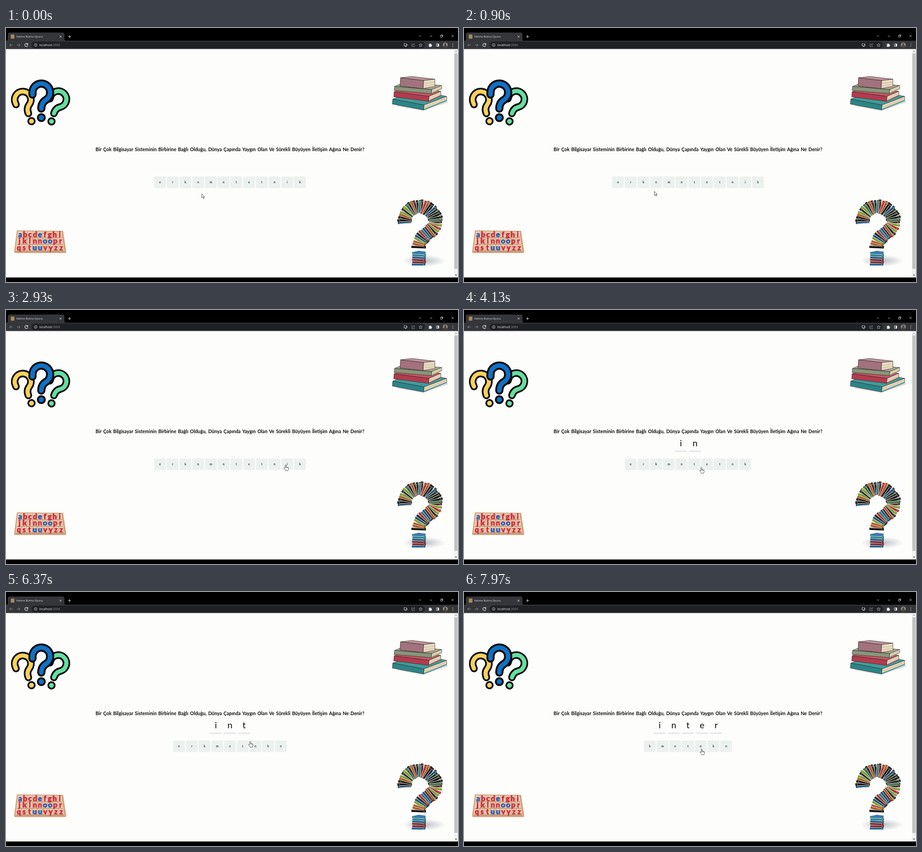
These frames come from a looping animation (998x561 px, 8 s). An HTML page:

```html
<!DOCTYPE html>
<html lang="tr">
<head>
<meta charset="utf-8">
<title>Kelime Bulma Oyunu</title>
<style>
  html, body { margin: 0; width: 100%; height: 100%; overflow: hidden; background: #000; }
  svg { display: block; width: 100vw; height: 100vh; }
  .ui { font-family: "Open Sans", sans-serif; }
  .page { font-family: Lato, sans-serif; text-anchor: middle; }
  .icon { fill: none; stroke: #dfe1e5; stroke-width: 1; }
</style>
</head>
<body>
<svg viewBox="0 0 998 561">
  <rect width="998" height="561"/>

  <!-- browser window -->
  <g class="ui">
    <path d="M1 28Q4 28 4 25V14Q4 10 8 10H125Q129 10 129 14V25Q129 28 132 28H998V47H0V28Z" fill="#35363a"/>
    <rect x="10.500" y="14.500" width="8" height="9" rx="1" fill="#a98a5c"/>
    <text x="23" y="21.300" font-size="5.950" fill="#e8eaed">Kelime Bulma Oyunu</text>
    <rect x="56" y="30" width="869" height="15" rx="7.500" fill="#202124"/>
    <text x="73.500" y="39.900" font-size="6.800" fill="#e8eaed">localhost<tspan fill="#8f959b">:3000</tspan></text>
    <g class="icon">
      <path d="M118.500 17l4 4m0-4l-4 4M137 19h6.500m-3.250-3.250v6.500"/>
      <path d="M15 37.500H8m3.300-3.300L8 37.500l3.300 3.300M24 37.500h7m-3.300-3.300l3.300 3.300-3.300 3.300" stroke="#85888d"/>
      <path d="M47.500 35.300A3.400 3.400 0 1 0 48.200 38.500M48.200 33.700v2.600h-2.700" stroke-width="1.200"/>
      <circle cx="65.500" cy="37.500" r="3" stroke-width=".8"/>
      <path d="M65.500 37v2.200m0-3.800v.8" stroke-width=".8"/>
      <path d="M911.800 16.500l2.300 2.300 2.300-2.300M936 18h5M983.500 15l5 5m0-5l-5 5" stroke-width=".8"/>
      <path d="M959.500 16.500h3.700v3.700h-3.700zM960.800 16.300v-1.200h3.700v3.700h-1.200" stroke-width=".8"/>
      <path d="M882.500 34.500h-3.500v5h6.500v-2m-4.500 3.500h3m.5-7v3.500m-1.500-1.500l1.500 1.500 1.500-1.500" stroke-width=".9"/>
      <path d="M898 35h-2v6h6v-2m-4 0q.500-3.500 4-3.500m-1.500-1.500l2 1.500-2 1.500" stroke="#9aa0a6" stroke-width=".8"/>
      <path d="M915.500 34l1.100 2.400 2.600.3-1.900 1.800.5 2.600-2.300-1.300-2.300 1.300.5-2.600-1.900-1.800 2.600-.3z" stroke-width=".7"/>
      <path d="M950.300 35h5.500v5.500h-5.500z"/>
    </g>
    <path d="M933.500 35.500h2a1.200 1.200 0 0 1 2.400 0h1.600v2a1.200 1.200 0 0 1 0 2.400v1.600h-6v-1.800a1.200 1.200 0 0 0 0-2.200zM953 35h2.800v5.500H953z" fill="#e8eaed"/>
    <circle cx="970" cy="37.500" r="5.500" fill="#8e8a84"/>
    <path d="M966 41.200q0-3.200 4-3.200t4 3.200a5.500 5.500 0 0 1-8 0z" fill="#47433f"/>
    <circle cx="970" cy="36" r="2.200" fill="#47433f"/>
    <path d="M986.500 34.500v.1m0 2.900v.1m0 2.900v.1" stroke="#e8eaed" stroke-width="1.400" stroke-linecap="round"/>
  </g>

  <!-- page -->
  <rect y="46.500" width="998" height="504.500" fill="#fdfdfb"/>
  <rect x="989" y="47" width="9" height="504" fill="#f1f1f1"/>
  <rect x="990" y="56" width="7" height="476" fill="#c1c1c1"/>
  <path d="M991 52.500h5l-2.500-2.700z" fill="#a3a3a3"/>
  <path d="M991 544.800h5l-2.500 2.700z" fill="#505050"/>
  <g id="art"></g>

  <g class="page">
    <text x="494.500" y="272.300" font-size="10.400" word-spacing="1.250" font-weight="700" fill="#0c0c0c">Bir Çok Bilgisayar Sisteminin Birbirine Bağlı Olduğu, Dünya Çapında Yaygın Olan Ve Sürekli Büyüyen İletişim Ağına Ne Denir?</text>
    <g id="answer"></g>
    <g id="tiles"></g>
  </g>

  <path id="arrow" d="M.4 .4V9.400L2.500 7.500L3.900 10.600L5.400 9.900L4 6.900H6.600Z" fill="#fff" stroke="#222" stroke-width=".8"/>
  <g id="hand" stroke="#222" stroke-width=".75" stroke-linejoin="round">
    <path d="M-1.100 7.500V1Q-1.100 0 0 0T1.100 1V4.600Q2.600 3.900 3 5Q4.400 4.500 4.800 5.700Q6.200 5.400 6.200 7V9Q6 10.500 5.200 11.500V12.600H-.2V11.500Q-2 9.900-3.500 7.500Q-3.700 6.200-2.500 6.300Z" fill="#fff"/>
    <path d="M1.100 4.600V6.500M3 5V6.700M4.800 5.700V7" fill="none"/>
  </g>
</svg>
<script>
const LOOP = 8000, MID = 494.5, TILE = 28.1, SLOT = 31.2;
const $ = id => document.getElementById(id);

function add(parent, tag, attrs, text) {
  const el = document.createElementNS('http://www.w3.org/2000/svg', tag);
  for (const k in attrs) el.setAttribute(k, attrs[k]);
  if (text) el.textContent = text;
  return parent.appendChild(el);
}

let seed = 11;
const rand = () => (seed = (seed * 16807) % 2147483647) / 2147483647;
const pick = list => list[Math.floor(rand() * list.length)];
const art = $('art');

function questionMark(x, y, turn, scale, color) {
  const g = add(art, 'g', { transform: `translate(${x} ${y}) rotate(${turn}) scale(${scale})`, fill: 'none', 'stroke-linecap': 'round' });
  const d = 'M-19.500 5V0A19.500 19.500 0 1 1 10 17Q0 23 0 36';
  for (const [stroke, w, r] of [['#080a0c', 18, 9.8], [color, 10, 5.8]]) {
    add(g, 'path', { d, stroke, 'stroke-width': w });
    add(g, 'circle', { cy: 56, r, fill: stroke });
  }
}

function stackedBook(x0, y0, xm, ym, xr, yr, h, cover, top) {
  const face = (points, fill) => add(art, 'polygon', { points, fill, stroke: '#33292b', 'stroke-width': .8, 'stroke-linejoin': 'round' });
  face([x0, y0, xm, ym, xr, yr, x0 + xr - xm, y0 + yr - ym], top);
  face([xm, ym, xr, yr, xr, yr + h - 2, xm - 1, ym + h], '#e9dcc0');
  for (const k of [.35, .65])
    add(art, 'line', { x1: xm + 1, y1: ym + h * k, x2: xr - 1, y2: yr + h * k, stroke: '#a8977c', 'stroke-width': .6 });
  add(art, 'line', { x1: xm - 1, y1: ym + h - .5, x2: xr, y2: yr + h - 2, stroke: cover, 'stroke-width': 1.6 });
  face([x0, y0, xm, ym, xm - 1, ym + h, x0 - 1, y0 + h], cover);
}

function letterTray() {
  add(art, 'polygon', { points: '24,447 126,448 133,494 132,497 19,497 18,494', fill: '#cfa27f' });
  add(art, 'polygon', { points: '26,449 124,450 130,493 21,493', fill: '#ecd0b4' });
  ['abcdefghi', 'jklnnoopr', 'qstuuvyzz'].forEach((row, r) => {
    const y = 450 + r * 14.5, left = 26 - r * 1.7, step = (98 + r * 3.6) / 9;
    add(art, 'path', { d: `M${left} ${y + 13.5}H${left + step * 9}`, stroke: '#b98a68', 'stroke-width': 1.4 });
    [...row].forEach((c, i) => {
      const x = left + step * (i + .5), fill = 'aeou'.includes(c) ? '#2c58ae' : '#cb2d3d';
      add(art, 'path', { d: `M${x + step / 2} ${y}l.8 13`, stroke: '#c2906e', 'stroke-width': 1 });
      add(art, 'text', { x, y: y + 11.5, 'font-size': 16, 'font-weight': 900, 'text-anchor': 'middle',
        'font-family': 'Lato, sans-serif', fill, stroke: fill, 'stroke-width': .7 }, c);
    });
  });
}

function bookMark() {
  const colors = ['#23262a', '#a82f35', '#2f6b4c', '#1f4f7d', '#151515', '#7d9c3c', '#1d2b22', '#a8582c', '#4a2c2a', '#2f7482'];
  const defs = add(art, 'defs', {}), fade = add(defs, 'radialGradient', { id: 'fade' });
  add(fade, 'stop', { offset: 0, 'stop-color': '#b9bfc4' });
  add(fade, 'stop', { offset: 1, 'stop-color': '#fdfdfb' });
  add(art, 'ellipse', { cx: 923, cy: 514, rx: 47, ry: 13, fill: 'url(#fade)' });
  const volume = (x, y, turn, len, thick, fill) => {
    const g = add(art, 'g', { transform: `translate(${x} ${y}) rotate(${turn})` });
    add(g, 'rect', { x: -len / 2, y: -thick / 2, width: len, height: thick, rx: .6, fill });
    add(g, 'path', { d: `M${-len / 2 + 5} ${thick / 2 - .6}H${len / 2}`, stroke: '#ece6d6', 'stroke-width': 1 });
    add(g, 'path', { d: `M${-len / 2 + 4} ${-thick / 2 + 1}v${thick - 2}`, stroke: '#d9b866', 'stroke-width': 1 });
  };
  const path = add(defs, 'path', { d: 'M880 430C880 407 895 394 913 394C932 394 949 410 949 428C949 452 911 454 911 486' });
  const total = path.getTotalLength();
  for (let s = 0; s < total; s += 4.6) {
    const a = path.getPointAtLength(Math.max(0, s - 1)), b = path.getPointAtLength(Math.min(total, s + 1));
    const turn = Math.atan2(b.y - a.y, b.x - a.x) * 180 / Math.PI + 90;
    volume((a.x + b.x) / 2, (a.y + b.y) / 2, turn + (rand() - .5) * 8, 27 + rand() * 6, 5.4, pick(colors));
  }
  const blues = ['#1f5f8f', '#2b7f96', '#203b63', '#2f8a86', '#7a2a32'];
  for (let i = 0; i < 6; i++) volume(912 + rand() * 2 - 1, 522 - i * 5, 180 + rand() * 4, 30, 5, pick(blues));
  add(art, 'polygon', { points: '898,495 911,492 927,494 925,498 911,499', fill: '#3f77b4' });
}

questionMark(37, 158, -22, .92, '#f8d05c');
questionMark(115.5, 157, 17, .92, '#66dd9f');
questionMark(78, 142, 0, 1, '#1270c2');
add(art, 'polygon', { points: '860,172 921,183 976,164 970,156', fill: '#d3d8d8' });
stackedBook(854, 157, 923, 170, 973, 151, 11, '#2b8587', '#3f9c9b');
stackedBook(857, 141, 934, 151, 960, 140, 11, '#b23c4d', '#c65563');
stackedBook(858, 129, 940, 136, 962, 127, 9, '#879779', '#9dac8e');
stackedBook(871, 110, 922, 116, 947, 113, 18, '#a2727e', '#bf949c');
letterTray();
bookMark();

// clicks: time, row, position in that row
const clicks = [
  [3020, 'tiles', 10], [3680, 'tiles', 3], [4330, 'tiles', 5], [5230, 'tiles', 4],
  [6000, 'answer', 3], [6980, 'tiles', 0], [7380, 'tiles', 0]
];

// pointer: time, x, y
const moves = [
  [0, 432, 366], [900, 420, 360.5], [1900, 420, 360.5], [2750, 618, 342], [3080, 617, 342],
  [3560, 440, 345], [3780, 440, 345], [4130, 524, 348], [4280, 512, 347], [4480, 510, 347],
  [5070, 482, 344], [5330, 484, 344], [5880, 541, 299], [6090, 541, 299], [6370, 539, 330],
  [6860, 386, 343], [7060, 387, 343], [7300, 395, 344], [7460, 396, 344], [7900, 524, 347], [8000, 525, 347]
];

function stateAt(t) {
  const s = { tiles: [...'erknmntetnik'], answer: [] };
  for (const [time, row, i] of clicks) {
    if (time > t) break;
    const other = row === 'tiles' ? 'answer' : 'tiles';
    s[other].push(s[row].splice(i, 1)[0]);
  }
  return s;
}

function pointerAt(t) {
  const i = Math.max(1, moves.findIndex(m => m[0] > t));
  const [t0, x0, y0] = moves[i - 1], [t1, x1, y1] = moves[i];
  const k = (t - t0) / (t1 - t0), e = k * k * (3 - 2 * k);
  return [x0 + (x1 - x0) * e, y0 + (y1 - y0) * e];
}

const rowX = (i, n, step) => MID + (i - (n - 1) / 2) * step;
let shown = '';

function drawRows({ tiles, answer }) {
  const key = tiles.join('') + '|' + answer.join('');
  if (key === shown) return;
  shown = key;
  $('tiles').replaceChildren();
  $('answer').replaceChildren();
  tiles.forEach((c, i) => {
    const x = rowX(i, tiles.length, TILE);
    add($('tiles'), 'rect', { x: x - 13, y: 328, width: 26, height: 25.5, rx: 2.5, fill: '#ecf0ef' });
    add($('tiles'), 'text', { x, y: 342.7, 'font-size': 6.8, 'font-weight': 700, fill: '#2b3238' }, c);
  });
  answer.forEach((c, i) => {
    const x = rowX(i, answer.length, SLOT);
    add($('answer'), 'text', { x, y: 301, 'font-size': 19.5, fill: '#0c0c0c' }, c);
    add($('answer'), 'rect', { x: x - 13, y: 311, width: 26, height: 1.6, fill: '#d4d5de' });
  });
}

function draw(t) {
  const s = stateAt(t), [x, y] = pointerAt(t);
  drawRows(s);
  const within = (n, step, top, bottom) => y > top && y < bottom && Math.abs(x - MID) < n * step / 2;
  const over = within(s.tiles.length, TILE, 328, 354) || within(s.answer.length, SLOT, 280, 313);
  for (const [id, on] of [['hand', over], ['arrow', !over]]) {
    $(id).setAttribute('transform', `translate(${x} ${y})`);
    $(id).setAttribute('visibility', on ? 'visible' : 'hidden');
  }
}

const start = performance.now();
function tick() {
  draw((performance.now() - start) % LOOP);
  requestAnimationFrame(tick);
}
tick();
</script>
</body>
</html>
```
